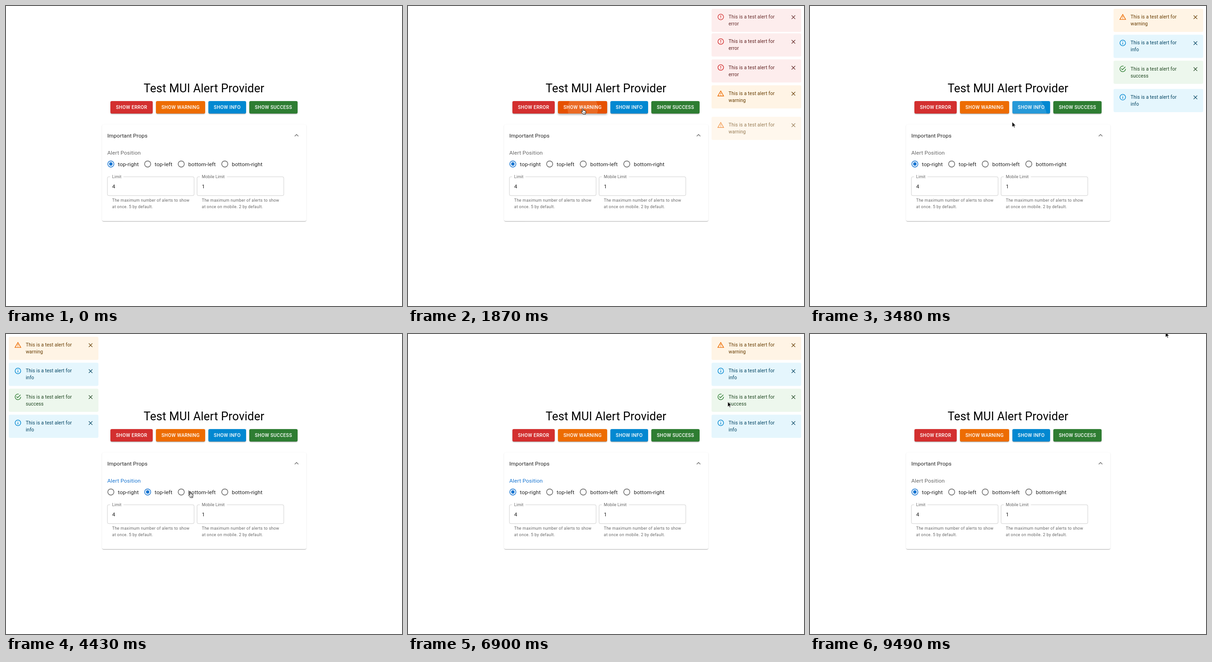
An HTML page for the animation above (9570 ms loop, 861 by 650 pixels).

```html
<!DOCTYPE html>
<html lang="en">
<head>
<meta charset="utf-8">
<title>Alert provider demo</title>
<style>
  html, body { margin: 0; width: 100%; height: 100%; overflow: hidden; background: #fff; }
  div, svg { position: absolute; }
  svg { left: 0; top: 0; }
  .paper {
    left: 208.5px; top: 256.5px; width: 444px; height: 209.5px; border-radius: 3px; background: #fff;
    box-shadow: 0 1.5px .75px -.75px #0003, 0 .75px .75px #00000024, 0 .75px 2.25px #0000001f;
  }
  .btn {
    top: 206.2px; height: 27px; border-radius: 3px; overflow: hidden;
    box-shadow: 0 2.2px .75px -1.5px #0003, 0 1.5px 1.5px #00000024, 0 .75px 3.7px #0000001f;
  }
  .btn.hover { box-shadow: 0 1.5px 3px -.75px #0003, 0 3px 3.7px #00000024, 0 .75px 7.4px #0000001f; }
  .ripple { border-radius: 50%; background: #fff; }
  text { font-family: Roboto, Arial, sans-serif; fill: #000000de; white-space: pre; }
  .h4 { font-size: 25.16px; letter-spacing: .00735em; fill: #000; }
  .body1 { font-size: 11.84px; letter-spacing: .00938em; }
  .body2 { font-size: 10.36px; letter-spacing: .01071em; }
  .button { font-size: 10.36px; font-weight: 500; letter-spacing: .02857em; fill: #fff; }
  .label { font-size: 8.88px; letter-spacing: .00938em; fill: #0009; }
  .caption { font-size: 8.88px; letter-spacing: .03333em; fill: #0009; }
  .mid { text-anchor: middle; }
  .icon { fill: none; stroke-width: 2; }
</style>
</head>
<body>
<script>
const LOOP = 9570, ROW = 56.27, EDGE = 5.92, RIGHT = 660, BOTTOM = 424.9;
const BLUE = '#1976d2', GREY = '#0009';
const RING = 'M12 3a9 9 0 1 1 0 18a9 9 0 1 1 0-18z';

const kinds = {
  error: { x: 227, w: 92, main: '#d32f2f', dark: '#c62828', bg: '#fdeded', ink: '#5f2120',
    icon: RING + 'M12 7v6m0 2v2' },
  warning: { x: 326, w: 107, main: '#ed6c02', dark: '#e65100', bg: '#fff4e5', ink: '#663c00',
    icon: 'M12 4 2.7 20h18.6zM12 10v4m0 2v2' },
  info: { x: 440, w: 82, main: '#0288d1', dark: '#01579b', bg: '#e5f6fd', ink: '#014361',
    icon: RING + 'M12 7v2m0 2v6' },
  success: { x: 529, w: 105, main: '#2e7d32', dark: '#1b5e20', bg: '#edf7ed', ink: '#1e4620',
    icon: 'M21 12a9 9 0 1 1-6.4-8.6M7.2 10.8 11 14.6 20.3 5.3' }
};

// kind, time shown, time dismissed
const alerts = [
  ['error', 620, 1850], ['error', 800, 2480], ['error', 1050, 2850],
  ['warning', 1600, 3300], ['warning', 1850, 8900],
  ['info', 2480, 7500], ['success', 2850, 8100], ['info', 3300, 8500]
].map(([kind, enter, exit]) => ({ kind, enter, exit }));

// name, circle centre, right end of the label
const radios = [['top-right', 228, 289], ['top-left', 308, 362], ['bottom-left', 381, 457], ['bottom-right', 475.7, 558]];
const picks = [[0, 0], [3950, 1], [4590, 2], [5300, 3], [6280, 0]];

// time, x, y of the pointer tip
const route = [
  [70, 500, 425], [500, 278, 229], [1150, 278, 229], [1450, 380, 222], [1900, 380, 222],
  [2250, 478, 222], [2430, 478, 222], [2640, 556, 220], [2880, 556, 220], [3150, 478, 222],
  [3330, 478, 222], [3800, 320, 342], [4080, 320, 342], [4420, 400, 342], [4600, 400, 342],
  [5130, 500, 342], [5310, 500, 342], [6130, 284, 345], [6320, 284, 345], [7190, 838, 78],
  [8520, 838, 78], [8780, 838, 22], [9280, 838, 22], [9490, 773, -4], [LOOP, 773, -4]
];

const ease = v => { v = Math.min(1, Math.max(0, v)); return v * v * (3 - 2 * v); };
const text = (cls, x, y, str, more = '') => `<text class="${cls}" x="${x}" y="${y}" ${more}>${str}</text>`;
const icon = (d, cx, cy, scale, color) =>
  `<path class="icon" d="${d}" stroke="${color}" transform="translate(${cx} ${cy}) scale(${scale}) translate(-12 -12)"/>`;

const field = (x, name, notch, value, help) => `
  <rect x="${x}" y="370" width="188.6" height="40.8" rx="3" fill="none" stroke="#0000003b" stroke-width=".8"/>
  <rect x="${x + 6}" y="369" width="${notch}" height="2" fill="#fff"/>
  ${text('label', x + 10.4, 373.2, name)}
  ${text('body1', x + 10.4, 394.6, value)}
  ${help.map((line, i) => text('caption', x + 10.4, 423.6 + i * 14.7, line)).join('')}`;

const radio = ([name, cx]) => `
  <g class="radio"><circle cx="${cx}" cy="342.3" r="6.66" fill="none" stroke-width="1.48"/>
  <circle class="dot" cx="${cx}" cy="342.3" r="3.7" fill="${BLUE}"/></g>
  ${text('body1', cx + 15.3, 346.5, name)}`;

const alertBox = ({ kind }) => {
  const { bg, ink, main, icon: shape } = kinds[kind];
  const fill = `style="fill:${ink}"`;
  return `<g class="alert"><rect width="195" height="50.35" rx="3" fill="${bg}"/>
    ${icon(shape, 20, 17.8, .678, main)}
    ${text('body2', 37, 21.3, 'This is a test alert for', fill)}
    ${text('body2', 37, 36.1, kind, fill)}
    <circle class="halo" cx="178" cy="18.3" r="11.1" fill="#00000014"/>
    ${icon('M5.7 5.7 18.3 18.3M18.3 5.7 5.7 18.3', 178, 18.3, .617, ink)}</g>`;
};

document.body.innerHTML = `<div class="paper"></div>
  ${Object.values(kinds).map(k =>
    `<div class="btn" style="left:${k.x}px;width:${k.w}px"><div class="ripple"></div></div>`).join('')}
  <svg width="861" height="650">
    ${text('h4 mid', 430.5, 186.6, 'Test MUI Alert Provider')}
    ${Object.entries(kinds).map(([name, k]) =>
      text('button mid', k.x + k.w / 2, 223.2, 'SHOW ' + name.toUpperCase())).join('')}
    ${text('body1', 220.3, 284.5, 'Important Props')}
    ${icon('M6.7 14.7 12 9.4l5.3 5.3', 631.7, 280.2, .74, '#0000008a')}
    ${text('body1', 220.3, 322.4, 'Alert Position', 'id="legend"')}
    ${radios.map(radio).join('')}
    ${field(220.4, 'Limit', 29, 4, ['The maximum number of alerts to show', 'at once. 5 by default.'])}
    ${field(415.4, 'Mobile Limit', 59, 1, ['The maximum number of alerts to show', 'at once on mobile. 2 by default.'])}
    ${alerts.map(alertBox).join('')}
    <g id="pointer">
      <path id="arrow" d="M0 0V11L2.6 8.6 4.3 12.4 6 11.7 4.3 8H7.8Z" stroke="#fff" stroke-width=".7"/>
      <g id="hand" stroke="#000" stroke-width=".9" stroke-linejoin="round">
        <path fill="#fff" d="M-1.2 1Q-.2-.7 1 1L1.6 4.5 3 4.2 3.7 5 4.9 4.8 5.4 5.7 6.4 5.8Q7.3 8 6.1 10.4V12.6H.8L-1.5 9.4-3.3 7Q-3.1 5.6-1.6 6.2L-.3 7.4Z"/>
        <path stroke-width=".7" d="M1.7 8.5v2.2M3.3 8.5v2.2M4.8 8.5v2.2"/>
      </g>
    </g>
  </svg>`;

const all = sel => [...document.querySelectorAll(sel)];
const [btnEls, radioEls, alertEls] = ['.btn', '.radio', '.alert'].map(all);
const show = (el, on) => { el.style.display = on ? '' : 'none'; };

function pointerAt(t) {
  const i = Math.max(1, route.findIndex(p => p[0] > t));
  const [t0, x0, y0] = route[i - 1], [t1, x1, y1] = route[i];
  const k = ease((t - t0) / (t1 - t0));
  return [x0 + (x1 - x0) * k, y0 + (y1 - y0) * k];
}

function drawButton(el, name, t, px, py) {
  const k = kinds[name];
  const over = t >= 70 && px > k.x && px < k.x + k.w && py > 206 && py < 233;
  el.classList.toggle('hover', over);
  el.style.background = over ? k.dark : k.main;
  const last = alerts.filter(a => a.kind === name && a.enter - 70 <= t).pop();
  const age = last ? t - last.enter + 70 : 1e4;
  const r = 110 * (1 - (1 - Math.min(1, age / 550)) ** 2);
  Object.assign(el.firstChild.style, {
    left: px - k.x - r + 'px', top: py - 206 - r + 'px', width: 2 * r + 'px', height: 2 * r + 'px',
    opacity: .14 * (1 - ease((age - 250) / 250))
  });
  return over;
}

function draw(t) {
  const [px, py] = pointerAt(t);
  const pick = picks.filter(p => p[0] <= t).pop()[1];
  const left = pick === 1 || pick === 2, low = pick > 1;
  const x = left ? EDGE : RIGHT;
  let hot = py > 257 && py < 303 && px > 209 && px < 652;

  Object.keys(kinds).forEach((name, i) => { hot = drawButton(btnEls[i], name, t, px, py) || hot; });

  radios.forEach(([, cx, end], i) => {
    radioEls[i].firstChild.setAttribute('stroke', i === pick ? BLUE : GREY);
    show(radioEls[i].querySelector('.dot'), i === pick);
    hot = hot || (px > cx - 9 && px < end && py > 333 && py < 353);
  });
  const focused = (t >= 3950 && t < 6130) || (t >= 6280 && t < 7500);
  document.getElementById('legend').style.fill = focused ? BLUE : GREY;

  let y = low ? BOTTOM : EDGE;
  alerts.forEach((a, i) => {
    const el = alertEls[i], gone = ease((t - a.exit) / 150);
    const visible = t >= a.enter && gone < 1;
    show(el, visible);
    if (!visible) return;
    const settle = Math.max(a.enter + 70, 1020);
    const top = y + 12 * (1 - ease((t - settle) / 200));
    el.setAttribute('transform', `translate(${x} ${top})`);
    el.setAttribute('opacity', Math.min(ease((t - a.enter + 40) / 100), 1 - gone));
    const over = Math.hypot(px - x - 178, py - top - 18.3) < 11;
    show(el.querySelector('.halo'), over);
    hot = hot || over;
    y += ROW * (1 - gone);
  });

  const pointer = document.getElementById('pointer');
  show(pointer, t >= 70);
  pointer.setAttribute('transform', `translate(${px} ${py})`);
  show(document.getElementById('hand'), hot);
  show(document.getElementById('arrow'), !hot);
}

function tick() {
  draw(performance.now() % LOOP);
  requestAnimationFrame(tick);
}
tick();
</script>
</body>
</html>
```
